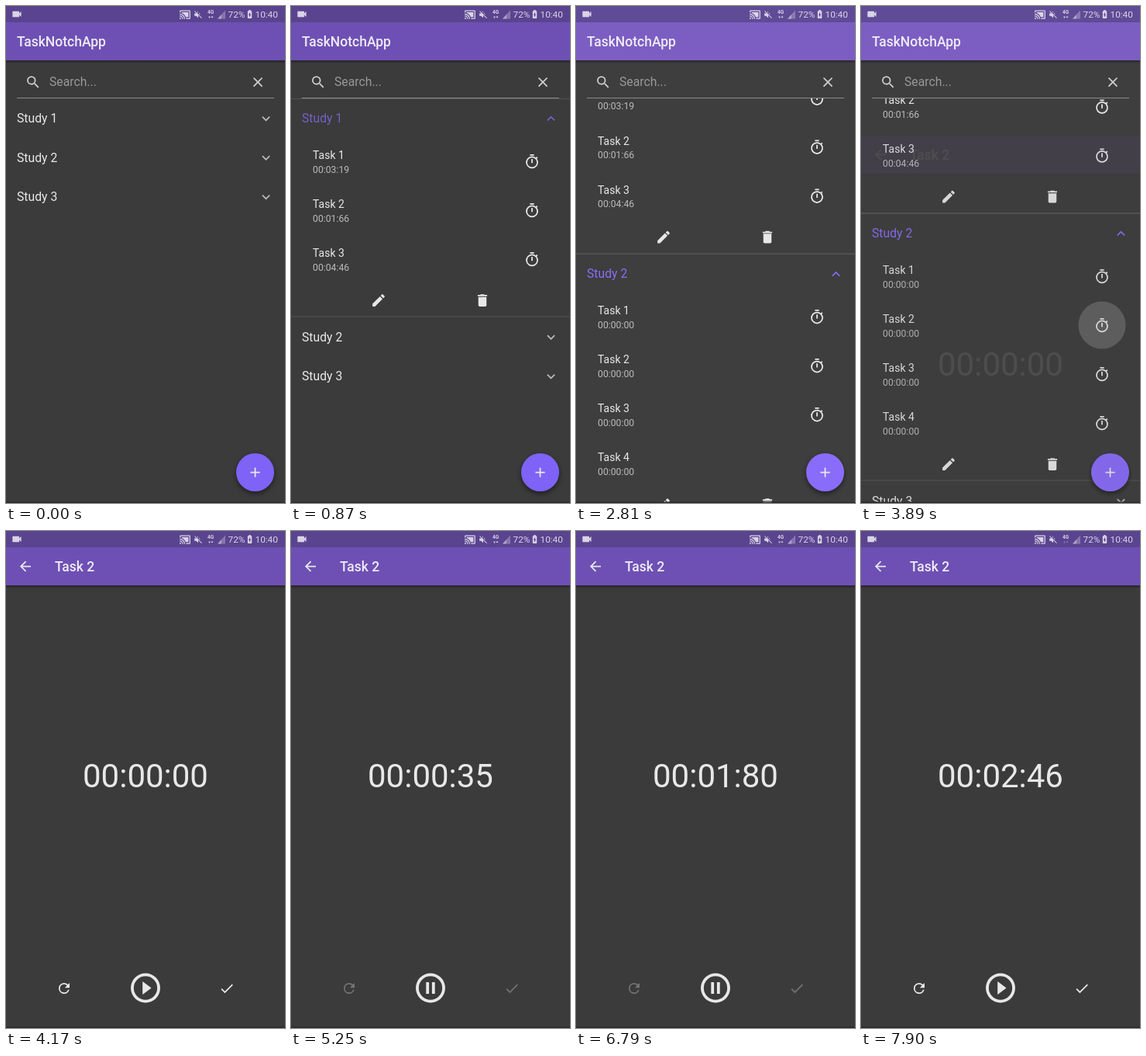
Write an HTML page that moves like this. It is 360 by 640 pixels and loops after 8000 ms.

```html
<!DOCTYPE html>
<html lang="en">
<head>
<meta charset="utf-8">
<title>Task timer</title>
<style>
html, body { margin: 0; width: 100%; height: 100%; overflow: hidden; background: #3b3b3b; }
svg { display: block; width: 360px; height: 640px; font-family: Roboto, "Liberation Sans", sans-serif; }
</style>
</head>
<body>
<svg id="stage" viewBox="0 0 360 640"></svg>
<script>
const LOOP = 8000, FRAME = 70;
const BG = '#3b3b3b', WHITE = '#e8e8e8', GREY = '#bababa';
const RING = 'M12 2a10 10 0 1 0 0 20 10 10 0 0 0 0-20zm0 18a8 8 0 1 1 0-16 8 8 0 0 1 0 16z';
const ICONS = {
  search: 'M15.5 14h-.79l-.28-.27A6.47 6.47 0 0 0 16 9.5 6.5 6.5 0 1 0 9.5 16c1.61 0 3.09-.59 4.23-1.57l.27.28v.79l5 4.99L20.49 19l-4.99-5zm-6 0a4.5 4.5 0 1 1 0-9 4.5 4.5 0 0 1 0 9z',
  close: 'M19 6.41L17.59 5 12 10.59 6.41 5 5 6.41 10.59 12 5 17.59 6.41 19 12 13.41 17.59 19 19 17.59 13.41 12z',
  down: 'M7.41 8.59L12 13.17l4.59-4.58L18 10l-6 6-6-6z',
  up: 'M7.41 15.41L12 10.83l4.59 4.58L18 14l-6-6-6 6z',
  timer: 'M15 1H9v2h6V1zm-4 13h2V8h-2v6zm8.03-6.61l1.42-1.42c-.43-.51-.9-.99-1.41-1.41l-1.42 1.42A8.96 8.96 0 0 0 12 4a9 9 0 1 0 7.03 3.39zM12 20a7 7 0 1 1 0-14 7 7 0 0 1 0 14z',
  edit: 'M3 17.25V21h3.75L17.81 9.94l-3.75-3.75L3 17.25zM20.71 7.04a1 1 0 0 0 0-1.41l-2.34-2.34a1 1 0 0 0-1.41 0l-1.83 1.83 3.75 3.75 1.83-1.83z',
  bin: 'M6 19c0 1.1.9 2 2 2h8c1.1 0 2-.9 2-2V7H6v12zM19 4h-3.5l-1-1h-5l-1 1H5v2h14V4z',
  back: 'M20 11H7.83l5.59-5.59L12 4l-8 8 8 8 1.41-1.41L7.83 13H20v-2z',
  reset: 'M17.65 6.35A7.96 7.96 0 0 0 12 4a8 8 0 1 0 7.73 10h-2.08A6 6 0 1 1 12 6c1.66 0 3.14.69 4.22 1.78L13 11h7V4l-2.35 2.35z',
  check: 'M9 16.17L4.83 12l-1.42 1.41L9 19 21 7l-1.41-1.41z',
  play: 'M10 16.5l6-4.5-6-4.5v9z' + RING,
  pause: 'M9 16h2V8H9v8zM13 16h2V8h-2v8z' + RING,
  plus: 'M19 13h-6v6h-2v-6H5v-2h6V5h2v6h6v2z',
  video: 'M17 10.5V7a1 1 0 0 0-1-1H4a1 1 0 0 0-1 1v10a1 1 0 0 0 1 1h12a1 1 0 0 0 1-1v-3.5l4 4v-11l-4 4z',
  cast: 'M19 7H5v1.63c3.96 1.28 7.09 4.41 8.37 8.37H19V7zM21 3H3c-1.1 0-2 .9-2 2v3h2V5h18v14h-7v2h7c1.1 0 2-.9 2-2V5c0-1.1-.9-2-2-2zM1 18v3h3a3 3 0 0 0-3-3zm0-4v2a5 5 0 0 1 5 5h2a7 7 0 0 0-7-7zm0-4v2a9 9 0 0 1 9 9h2A11 11 0 0 0 1 10z',
  mute: 'M16.5 12A4.5 4.5 0 0 0 14 7.97v2.21l2.45 2.45c.03-.2.05-.41.05-.63zM4.27 3L3 4.27 7.73 9H3v6h4l5 5v-6.73l6 6L19.73 21 21 19.73 4.27 3zM12 4L9.91 6.09 12 8.18V4z',
  battery: 'M15.67 4H14V2h-4v2H8.33C7.6 4 7 4.6 7 5.33v15.33C7 21.4 7.6 22 8.33 22h7.33c.74 0 1.34-.6 1.34-1.33V5.33C17 4.6 16.4 4 15.67 4zM11 20v-5.5H9L13 7v5.5h2L11 20z',
};

const clamp = v => Math.max(0, Math.min(1, v));
const pad = n => String(n).padStart(2, '0');
// Time since start, held for one frame at a time
const held = (t, start) => Math.floor((t - start) / FRAME) * FRAME;

const rect = (x, y, w, h, fill, more = '') =>
  `<rect x="${x}" y="${y}" width="${w}" height="${h}" fill="${fill}" ${more}/>`;
const circle = (x, y, r, fill, more = '') =>
  `<circle cx="${x}" cy="${y}" r="${r}" fill="${fill}" ${more}/>`;
// y is the middle of the capitals
const text = (s, x, y, size, fill = WHITE, more = '') =>
  `<text x="${x}" y="${y + size * 0.355}" font-size="${size}" fill="${fill}" ${more}>${s}</text>`;
const icon = (name, x, y, fill = WHITE, size = 21) =>
  `<path d="${ICONS[name]}" fill="${fill}" transform="translate(${x - size / 2} ${y - size / 2}) scale(${size / 24})"/>`;
const ripple = (x, y, r, age, life) => age < 0 || age >= life ? '' :
  circle(x, y, r, '#fff', `opacity="${0.18 * (1 - age / life)}"`);

function statusBar(t, light) {
  const c = '#d9d4e6';
  return rect(0, 0, 360, 21, light ? '#604b96' : '#5a448f')
    + icon('video', 14, 10.5, c, 15) + icon('cast', 231, 11, c, 15) + icon('mute', 248, 11, c, 13)
    + text('4G', 260, 8, 6.5, c, 'font-weight="700"')
    + `<path d="M261 13.5h3l-1.5 2.5zM264.5 15h3l-1.5-2.5z" fill="${c}" opacity="${t >= 7900 ? 0.35 : 0.9}"/>`
    + `<path d="M273 16.5h10v-11z" fill="${c}" opacity=".35"/><path d="M273 16.5h5v-5.5z" fill="${c}" opacity=".5"/>`
    + text('72%', 286.5, 11.3, 11.8, c) + icon('battery', 314.5, 10.5, c, 13)
    + text('10:40', 321.5, 11.3, 11.8, c);
}

const appBar = (title, x, fill) => rect(0, 70, 360, 4, 'url(#shade)') + rect(0, 21, 360, 49, fill)
  + text(title, x, 45.7, 17.5, '#eeeaf5', 'font-weight="500"');

// One study of the list; h is the middle of its heading
function study(n, h, times, open, accent) {
  let s = text('Study ' + n, 14, h - 0.3, 15.75, open ? accent : WHITE)
    + icon(open ? 'up' : 'down', 335.5, h, open ? accent : GREY);
  if (!open) return { s, next: h + 50.5 };
  times.forEach((time, i) => {
    const y = h + 47 + 63 * i;
    s += text('Task ' + (i + 1), 28, y, 14) + text(time, 28, y + 18.3, 12.25, GREY)
      + icon('timer', 311, y + 8.5);
  });
  const end = h + 66.5 + 63 * times.length;
  s += icon('edit', 113, end - 21.5) + icon('bin', 247, end - 21.5)
    + rect(0, h - 26, 360, 1, '#545454') + rect(0, end - 1, 360, 1, '#545454');
  return { s, next: end + 26 };
}

function listScreen(t, light) {
  const accent = light ? '#8b6cf8' : '#7560c6';
  const u = clamp((held(t, 2670) + FRAME) / 560);
  const scroll = 133.5 * (1 - (1 - u) ** 2);
  const first = study(1, 145, ['00:03:19', '00:01:66', '00:04:46'], t >= 660, accent);
  const second = study(2, first.next, Array(4).fill('00:00:00'), t >= 1600, accent);
  const third = study(3, second.next, [], false, accent);
  const flash = (start, y) => t < start || t >= start + 210 ? '' :
    rect(14, y, 346, 50, '#fff', `opacity="${0.07 * (1 - held(t, start) / 210)}"`);
  return rect(0, 21, 360, 619, light ? '#3e3e3e' : BG)
    + `<g clip-path="url(#list)"><g transform="translate(0 ${-scroll})">`
    + flash(660, 120) + flash(1600, 401)
    + ripple(311, 544.5, 30.5, held(t, 3890), 280)
    + first.s + second.s + third.s + '</g></g>'
    + rect(14, 118, 332, 1, '#8a8a8a')
    + icon('search', 35, 98, '#cfcfcf') + text('Search...', 56, 97.3, 15.75, '#989898')
    + icon('close', 325, 98, '#cfcfcf')
    + appBar('TaskNotchApp', 14, light ? '#7c5ec2' : '#6e50b4')
    + `<g style="filter:drop-shadow(0 3px 3px #0007)">${circle(321.5, 600.5, 24.5, light ? '#8a6cfb' : '#7e63f6')}</g>`
    + icon('plus', 321.5, 600.5);
}

function timerScreen(t) {
  const running = t >= 4830 && t < 7490;
  const age = held(Math.min(t, 7490), 4830);
  const cs = Math.max(0, Math.floor(108.05 + (age - 1190) * 0.0939));
  const clock = ['00', pad(Math.floor(cs / 100)), pad(cs % 100)].join(':');
  const side = running ? '#737373' : WHITE;
  return rect(0, 21, 360, 619, BG) + appBar('Task 2', 63, '#6e50b4') + icon('back', 25, 45.5)
    + text(clock, 180, 315, 42, WHITE, 'text-anchor="middle"')
    + ripple(180, 588.5, 41, held(t, 4830), 350) + ripple(180, 588.5, 41, held(t, 7420), 280)
    + icon('reset', 75, 589, side) + icon('check', 285, 589, side)
    + icon(running ? 'pause' : 'play', 180, 588.5, WHITE, 45.5);
}

const DEFS = `<defs><linearGradient id="shade" x2="0" y2="1"><stop stop-color="#000" stop-opacity=".4"/>
  <stop offset="1" stop-color="#000" stop-opacity="0"/></linearGradient>
  <clipPath id="list"><path d="M0 119h360v521H0z"/></clipPath></defs>`;

function render(t) {
  const light = t >= 2670 && t < 3960;
  let s = DEFS;
  if (t < 4170) s += listScreen(t, light);
  if (t >= 3890) {
    // The timer rises from below while it fades in
    const u = clamp((held(t, 3890) + FRAME) / 350);
    s += `<g opacity="${u ** 1.5}" transform="translate(0 ${228 * (1 - u) ** 2})">${timerScreen(t)}</g>`;
  }
  return s + rect(0, 638.5, 360, 1.5, '#2b2b2b') + statusBar(t, light);
}

const stage = document.getElementById('stage');
let shown = '';
function tick() {
  const s = render(performance.now() % LOOP);
  if (s !== shown) stage.innerHTML = shown = s;
  requestAnimationFrame(tick);
}
tick();
</script>
</body>
</html>
```
